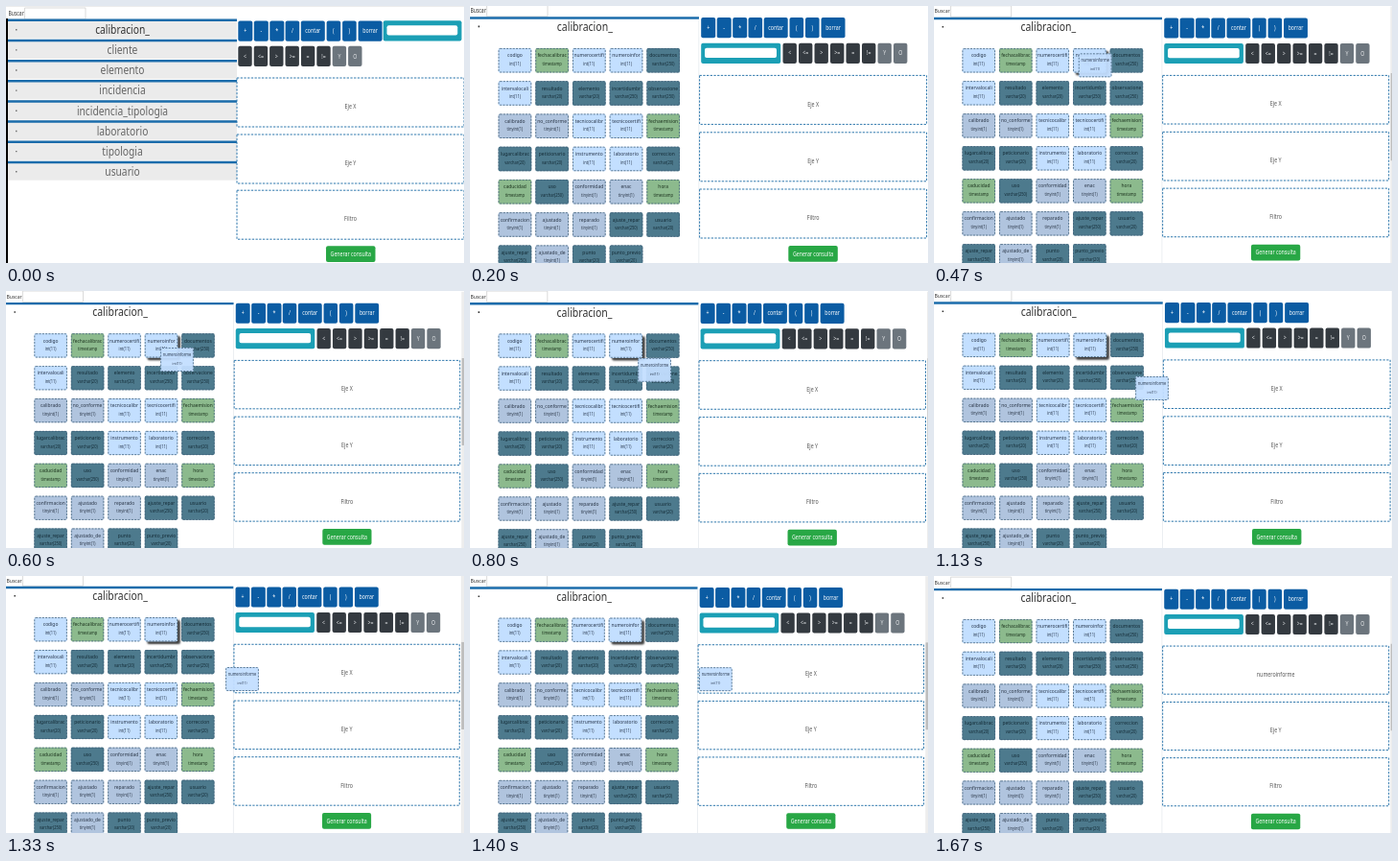
Animation, 478 px wide and 268 px high, one loop 1790 ms. Source, as an HTML page with a canvas:

```html
<!DOCTYPE html>
<html lang="es">
<head>
<meta charset="utf-8">
<title>Constructor de consultas</title>
<style>
  html, body { margin: 0; width: 100%; height: 100%; overflow: hidden; background: #fff; }
  canvas { display: block; width: 478px; height: 268px; filter: blur(0.5px); }
</style>
</head>
<body>
<canvas id="stage"></canvas>
<script>
const W = 478, H = 268, LOOP = 1790, STEP = 6.667, LAST = 25;
const ASPECT = 0.82;
const FONT = '"Noto Sans", "Open Sans", sans-serif';
const BLUE = '#0b5ca3', LINE = '#1b6cab', TEAL = '#1b9fb5', DARK = '#343a40', GREY = '#6c757d';

const canvas = document.getElementById('stage');
const ctx = canvas.getContext('2d');
const ratio = window.devicePixelRatio || 1;
canvas.width = W * ratio;
canvas.height = H * ratio;

const TYPES = {
  i: ['int(11)', '#c3dfff', '#27364a'],
  t: ['timestamp', '#8cba8d', '#1c331e'],
  b: ['tinyint(1)', '#b0c4de', '#2a3647'],
  v: ['varchar(250)', '#4d7a8d', '#142b36'],
  s: ['varchar(20)', '#4d7a8d', '#142b36']
};
const FIELDS = [
  'codigo:i fechacalibrac:t numerocertifi:i numeroinfor:i documentos:v',
  'intervalocali:i resultado:s elemento:s incertidumbr:v observacione:v',
  'calibrado:b no_conforme:b tecnicocalibr:i tecnicocertifi:i fechaemision:t',
  'lugarcalibrac:s peticionario:s instrumento:i laboratorio:i correccion:s',
  'caducidad:t uso:v conformidad:b enac:b hora:t',
  'confirmacion:b ajustado:b reparado:b ajuste_repar:v usuario:s',
  'ajuste_repar:v ajustado_de:b punto:s punto_previo:s'
].map(row => row.split(' ').map(f => f.split(':')));
const TABLES = ['calibracion_', 'cliente', 'elemento', 'incidencia',
  'incidencia_tipologia', 'laboratorio', 'tipologia', 'usuario'];

// step, x scale, y scale, y offset of the slightly drifting picture
const DRIFT = [
  [1, 1, 1, 0], [3, 1, 1, 0], [9, 0.994, 0.989, 0.8], [14, 1, 0.994, 0.9],
  [17, 0.999, 0.992, 0.1], [20, 0.993, 0.99, -0.4], [24, 0.996, 0.983, 1.9], [25, 0.996, 0.983, 1.9]
];
// step, centre x, centre y of the dragged field
const DRAG = [
  [6, 163, 57], [9, 178.5, 71.5], [14, 202, 89.5],
  [17, 227.5, 101.5], [20, 246.5, 107.5], [23, 276, 108]
];

function along(keys, step) {
  let k = 0;
  while (k < keys.length - 2 && step >= keys[k + 1][0]) k++;
  const a = keys[k], b = keys[k + 1];
  const p = Math.min(1, Math.max(0, (step - a[0]) / (b[0] - a[0])));
  return a.slice(1).map((v, i) => v + (b[i + 1] - v) * p);
}

function rect(x, y, w, h, color, r = 0) {
  ctx.fillStyle = color;
  ctx.beginPath();
  ctx.roundRect(x, y, w, h, r);
  ctx.fill();
}

function outline(x, y, w, h, color, width, dash = [], r = 0) {
  ctx.strokeStyle = color;
  ctx.lineWidth = width;
  ctx.setLineDash(dash);
  ctx.beginPath();
  ctx.roundRect(x, y, w, h, r);
  ctx.stroke();
  ctx.setLineDash([]);
}

function text(str, x, y, size, color, align = 'center') {
  ctx.save();
  ctx.translate(x, y + size * 0.35);
  ctx.scale(ASPECT, 1);
  ctx.font = `${size}px ${FONT}`;
  ctx.textAlign = align;
  ctx.fillStyle = color;
  ctx.fillText(str, 0, 0);
  ctx.restore();
}

function button(label, x, y, w, color, ink = '#fff') {
  rect(x, y, w, 21.3, color, 2);
  text(label, x + w / 2, y + 10.5, 6.4, ink);
}

function cell(x, y, name, type, h, size, subSize) {
  const [kind, fill, ink] = TYPES[type];
  const w = 34.6;
  rect(x, y, w, h, fill, 1.5);
  outline(x + 0.4, y + 0.4, w - 0.8, h - 0.8, '#3f5f78', 0.8, [2, 1.3], 1.5);
  ctx.save();
  ctx.beginPath();
  ctx.rect(x + 1.5, y, w - 3, h);
  ctx.clip();
  text(name, x + w / 2, y + 7.2, size, ink);
  text(kind, x + w / 2, y + 16.2, subSize, ink);
  ctx.restore();
}

function search(x, y) {
  rect(x + 17, y - 5.6, 63.5, 11.6, '#fff');
  outline(x + 17, y - 5.6, 63.5, 11.6, '#d2d2d2', 0.8);
  text('Buscar', x, y, 6.2, '#333', 'left');
}

function operators(x, y) {
  const ops = [['+', 0, 15], ['-', 16.5, 15], ['*', 33, 15], ['/', 49.3, 14.6],
    ['contar', 65.5, 25], ['(', 92.3, 14.6], [')', 108.8, 14.6], ['borrar', 125.3, 25]];
  ops.forEach(([s, dx, w]) => button(s, x + dx, y, w, BLUE));
}

function comparers(x, y, pitch) {
  ['<', '<=', '>', '>=', '=', '!=', 'Y', 'O'].forEach((s, i) =>
    button(s, x + i * pitch, y, 14.4, i < 6 ? DARK : GREY, '#e8eaec'));
}

function valueBox(x, y, w) {
  rect(x, y, w, 21.3, TEAL, 2);
  rect(x + 3.8, y + 5, w - 8, 10.4, '#fff', 2);
}

function dropZones(x, tops, first) {
  [first, 'Eje Y', 'Filtro'].forEach((s, i) => {
    outline(x, tops[i], 237, 51, '#2f78ad', 1, [2.3, 1.4]);
    text(s, x + 118.5, tops[i] + 30, 6.5, '#555');
  });
}

function generate(x, y) {
  rect(x, y, 51.5, 16.8, '#28a745', 2);
  text('Generar consulta', x + 25.75, y + 8.4, 6.4, '#fff');
}

function closedPage() {
  rect(0, 0, W, 1, '#ececec');
  search(2.5, 7.6);
  TABLES.forEach((name, i) => {
    const y = 13.6 + i * 21.15;
    rect(2, y, 239, 20.2, '#ebebeb');
    rect(2, y, 239, 2.5, LINE);
    text(name, 121.5, y + 11, 12.5, i ? '#666' : '#333');
    rect(10.2, y + 10.4, 1.2, 1.4, '#555');
  });
  rect(0, 13, 2, H - 13, '#000');
  operators(242.3, 15.4);
  valueBox(393.7, 15.2, 81.8);
  comparers(242.3, 41.8, 16.4);
  dropZones(241, [75, 134, 192.2], 'Eje X');
  generate(334, 250.3);
}

function openPage(step, held, dropped) {
  const [sx, sy, dy] = along(DRIFT, step);
  ctx.save();
  ctx.transform(sx, 0, 0, sy, 0, dy);
  search(0.5, 4.8);
  rect(0, 11.3, 239, 2.4, LINE);
  rect(238.6, 13.7, 0.6, 270, '#dde3e8');
  text('calibracion_', 119.8, 21.5, 12.8, '#333');
  rect(8.5, 20.6, 1.5, 1.6, '#333');
  FIELDS.forEach((row, r) => row.forEach(([name, type], c) => {
    const x = 29.6 + c * 38.7, y = 44 + r * 34.25;
    if (held && r === 0 && c === 3) {
      ctx.save();
      ctx.shadowColor = 'rgba(0,0,0,.75)';
      ctx.shadowBlur = 2 * ratio;
      ctx.shadowOffsetX = ctx.shadowOffsetY = 2.8 * ratio;
      rect(x, y, 34.6, 25.4, TYPES.i[1], 2);
      ctx.restore();
    }
    cell(x, y, name, type, 25.4, 6, 4.9);
  }));
  operators(241.2, 12);
  valueBox(241.2, 38.7, 83);
  comparers(326.5, 38.7, 16.5);
  dropZones(239.6, [72.4, 131.8, 191], dropped ? 'numeroinforme' : 'Eje X');
  generate(332.3, 250);
  rect(478.2, 0, 6, 280, '#ededed');
  rect(478.6, 70, 5, 92, '#bdbdbd');
  ctx.restore();
}

function draw(t) {
  const step = Math.min(LAST, Math.floor((Math.floor(t / 10) + 0.5) / STEP));
  ctx.setTransform(ratio, 0, 0, ratio, 0, 0);
  rect(0, 0, W, H, '#fff');
  if (step === 0) return closedPage();
  const held = step >= 6 && step < 23;
  openPage(step, held, step >= 23);
  if (held) {
    const [x, y] = along(DRAG, step);
    ctx.globalAlpha = 0.94;
    cell(x - 17.3, y - 12.4, 'numeroinforme', 'i', 24.8, 4.8, 4);
    ctx.globalAlpha = 1;
  }
}

function tick() {
  draw(performance.now() % LOOP);
  requestAnimationFrame(tick);
}
tick();
</script>
</body>
</html>
```
